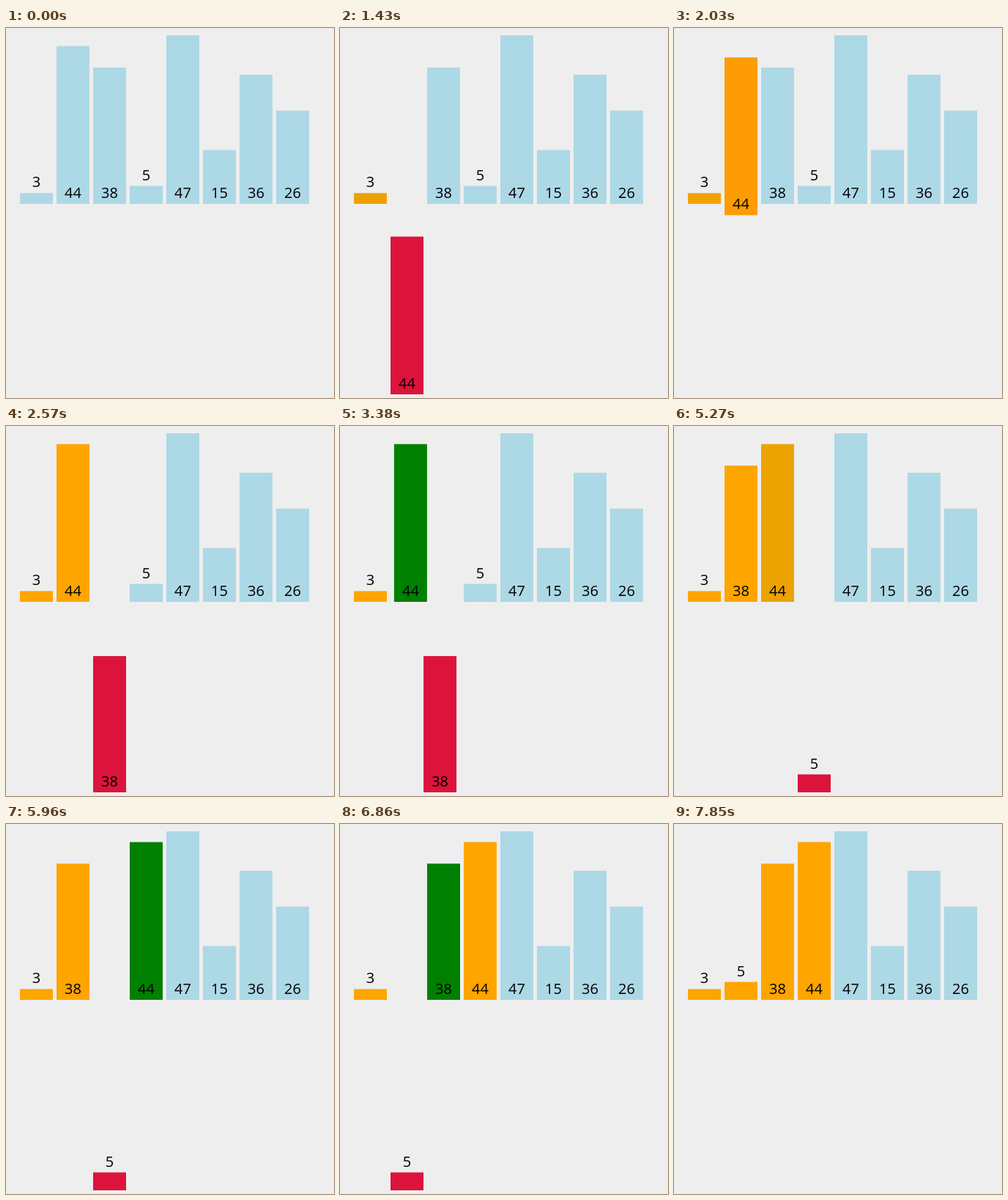
Animation, 448 px wide and 505 px high, one loop 8000 ms. Source, as an HTML page with a canvas:

```html
<!DOCTYPE html>
<html lang="en">
<head>
<meta charset="utf-8">
<title>Insertion sort</title>
<style>
  html, body { margin: 0; width: 100%; height: 100%; overflow: hidden; background: #eee; }
  canvas { display: block; }
</style>
</head>
<body>
<canvas width="448" height="505"></canvas>
<script>
const LOOP = 8000;
const SLOT = 50, BAR_WIDTH = 45, LEFT = 19, BASE = 240, DROP = 260;
const VALUES = [3, 44, 38, 5, 47, 15, 36, 26];
const UNIT = 230 / Math.max(...VALUES);

const BLUE = [173, 216, 230], ORANGE = [255, 165, 0], GREEN = [0, 128, 0], RED = [220, 20, 60];

const paint = color => ({ color });
const lift = { color: RED, drop: 1 };
const settle = { color: ORANGE, drop: 0 };
const shift = slot => ({ slot });

// [first visible change, last visible change, changes keyed by bar value]
const STEPS = [
  [500, 590, { 3: paint(ORANGE) }],
  [890, 1130, { 44: lift }],
  [1430, 1580, { 3: paint(GREEN) }],
  [1880, 2090, { 3: paint(ORANGE), 44: settle }],
  [2360, 2570, { 38: lift }],
  [2900, 3020, { 44: paint(GREEN) }],
  [3350, 3530, { 44: shift(2), 38: shift(1) }],
  [3860, 3980, { 3: paint(GREEN), 44: paint(ORANGE) }],
  [4280, 4490, { 3: paint(ORANGE), 38: settle }],
  [4730, 4970, { 5: lift }],
  [5270, 5390, { 44: paint(GREEN) }],
  [5720, 5960, { 44: shift(3), 5: shift(2) }],
  [6260, 6380, { 38: paint(GREEN), 44: paint(ORANGE) }],
  [6680, 6860, { 38: shift(2), 5: shift(1) }],
  [7190, 7340, { 3: paint(GREEN), 38: paint(ORANGE) }],
  [7640, 7850, { 3: paint(ORANGE), 5: settle }]
];

const ctx = document.querySelector('canvas').getContext('2d');

const easeCubic = t => t < 0.5 ? 4 * t ** 3 : 1 - 4 * (1 - t) ** 3;
const mix = (a, b, k) => Array.isArray(a) ? a.map((v, i) => mix(v, b[i], k)) : a + (b - a) * k;

// Pure colour fades have imperceptible ends, so they run longer than they show.
function progress([first, last, changes], time) {
  const moves = Object.values(changes).some(c => 'slot' in c || 'drop' in c);
  const length = moves ? last - first + 30 : (last - first) / 0.59;
  const start = moves ? first - 30 : first - 0.26 * length;
  return easeCubic(Math.min(1, Math.max(0, (time - start) / length)));
}

function barsAt(time) {
  const bars = {};
  VALUES.forEach((value, slot) => bars[value] = { value, slot, drop: 0, color: BLUE });
  for (const step of STEPS) {
    const k = progress(step, time);
    if (k === 0) break;
    for (const [value, change] of Object.entries(step[2])) {
      const bar = bars[value];
      for (const key in change) bar[key] = mix(bar[key], change[key], k);
    }
  }
  return Object.values(bars);
}

function drawBar({ value, slot, drop, color }) {
  const x = LEFT + slot * SLOT;
  const bottom = BASE + drop * DROP;
  const height = value * UNIT;
  ctx.fillStyle = `rgb(${color.map(Math.round)})`;
  ctx.fillRect(x, bottom - height, BAR_WIDTH, height);
  ctx.fillStyle = '#000';
  ctx.fillText(value, x + BAR_WIDTH / 2, bottom - 8 - (value < 10 ? height : 0));
}

function draw(now) {
  ctx.fillStyle = '#eee';
  ctx.fillRect(0, 0, 448, 505);
  ctx.font = '20px "Open Sans", "Noto Sans", sans-serif';
  ctx.textAlign = 'center';
  barsAt(now % LOOP).forEach(drawBar);
  requestAnimationFrame(draw);
}

const begin = performance.now();
(function frame() {
  draw.call(null, 0);
});
requestAnimationFrame(function tick(now) {
  draw(Math.max(0, now));
});
</script>
</body>
</html>
```
